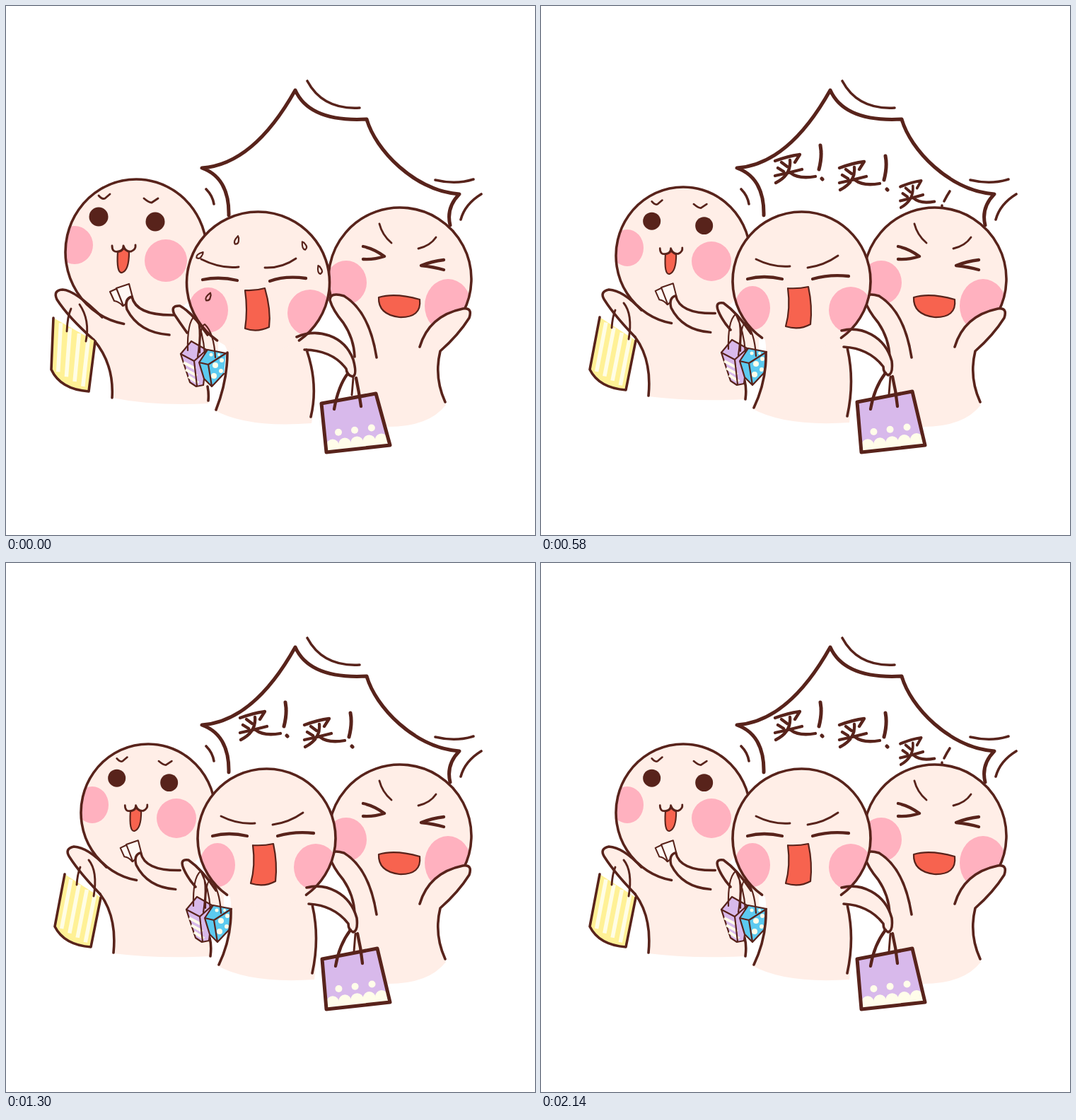
An HTML page that plays this animation: 748 by 748 pixels, repeating every 2340 ms.

```html
<!DOCTYPE html>
<html lang="zh">
<head>
<meta charset="utf-8">
<title>买！买！买！</title>
<style>
html, body { margin: 0; width: 100%; height: 100%; overflow: hidden; background: #fff; }
svg { display: block; width: 100%; height: 100%; }
.line { fill: none; stroke: #58231b; stroke-width: 3.6; stroke-linecap: round; stroke-linejoin: round; }
.thin { stroke-width: 2.2; }
.soft { stroke-width: 2.9; }
.wide { stroke-width: 4.3; }
.bold { stroke-width: 5; }
.skin { fill: #ffeee7; }
.pink { fill: #ffb1bf; }
.red { fill: #f7634f; }
.cream { fill: #fffdea; }
.paper { fill: #fff8f4; }
.yellow { fill: #fff196; }
.lilac { fill: #d8b9eb; }
.blue { fill: #5ccaf0; }
.dark { fill: #58231b; }
.pose, .word { visibility: hidden; animation: pose 780ms step-end infinite; }
@keyframes pose { 0% { visibility: visible } 33.33%, 100% { visibility: hidden } }
@keyframes glyph0 { 0% { visibility: hidden } 3.84%, 100% { visibility: visible } }
@keyframes bang0 { 0% { visibility: hidden } 7.69%, 100% { visibility: visible } }
@keyframes glyph1 { 0% { visibility: hidden } 37.17%, 100% { visibility: visible } }
@keyframes bang1 { 0% { visibility: hidden } 41.02%, 100% { visibility: visible } }
@keyframes glyph2 { 0% { visibility: hidden } 70.51%, 100% { visibility: visible } }
@keyframes bang2 { 0% { visibility: hidden } 74.35%, 100% { visibility: visible } }
</style>
</head>
<body>
<svg id="stage" viewBox="0 0 748 748"></svg>
<script>
const line = (d, pen = '') => `<path class="line ${pen}" d="${d}"/>`;
const fill = (cls, d) => `<path class="${cls}" d="${d}"/>`;
const both = (cls, d, pen = '') => fill(cls, d) + line(d, pen);
const oval = (cls, [x, y, rx, ry = rx]) => `<ellipse class="${cls}" cx="${x}" cy="${y}" rx="${rx}" ry="${ry}"/>`;
const shift = (t, body) => `<g transform="${t}">${body}</g>`;
const mix = (a, b, t) => a.map((v, i) => v + (b[i] - v) * t);
// Point inside a quad given as top-left, top-right, bottom-right, bottom-left.
const inQuad = ([a, b, c, d], s, t) => mix(mix(a, b, s), mix(d, c, s), t);
let clips = 0;

// Head ellipse with clipped cheeks; its outline runs clockwise between two angles.
function head([cx, cy, rx, ry], from, to, cheeks) {
  const at = deg => {
    const r = deg * Math.PI / 180;
    return `${cx + rx * Math.cos(r)} ${cy + ry * Math.sin(r)}`;
  };
  const id = 'head' + clips++, shape = [cx, cy, rx, ry];
  return `<clipPath id="${id}">${oval('', shape)}</clipPath>` + oval('skin', shape) +
    `<g clip-path="url(#${id})">${cheeks.map(c => oval('pink', c)).join('')}</g>` +
    line(`M${at(from)} A${rx} ${ry} 0 1 1 ${at(to)}`);
}

function drops(list) {
  return list.map(([x, y, turn]) =>
    shift(`translate(${x} ${y}) rotate(${turn})`, line('M1 -6 Q-5 3 -1 6 Q4 5 3 0 Q3 -4 1 -6', 'thin'))).join('');
}

function stripedBag(q, handle) {
  const [a, b, c, d] = q;
  const sides = `M${a} L${d} Q${d[0] + 13} ${c[1] - 3} ${c} L${b}`;
  let out = fill('yellow', sides + 'Z');
  for (let i = 0; i < 4; i++) {
    const s = .18 + i * .22;
    out += `<path d="M${inQuad(q, s, .02)} L${inQuad(q, s, .97)}" stroke="#fffde6" stroke-width="5.5"/>`;
  }
  return out + line(sides) + line(handle, 'soft');
}

function dottedBag(q, handle, backHandle) {
  let out = fill('lilac', `M${q.join('L')}Z`);
  for (let i = 0; i < 5; i++) out += oval('cream', [...inQuad(q, .11 + i * .195, .88), 9]);
  out += fill('cream', `M${[[0, .88], [1, .88], [1, 1], [0, 1]].map(p => inQuad(q, ...p)).join('L')}Z`);
  [.23, .5, .78].forEach(s => out += oval('cream', [...inQuad(q, s, .63), 5]));
  return out + line(`M${q.join('L')}Z`, 'bold') + line(backHandle, 'soft') + line(handle, 'wide');
}

const smallBags =
  both('lilac', 'M247 492 L262 474 L285 487 L279 536 L269 538 L260 532Z', 'thin') +
  `<path d="M251 504 L268 513 M254 514 L270 523 M258 524 L272 533" stroke="#fffdea" stroke-width="4"/>` +
  line('M247 492 L266 502 L284 486 M266 502 L270 537', 'thin') +
  fill('blue', 'M273 504 L285 486 L311 491 L308 520 L291 538 L280 527Z') +
  [[296, 508, 4], [305, 501, 3], [294, 523, 4], [304, 516, 3], [290, 493, 2.5], [301, 493, 2]].map(c => oval('cream', c)).join('') +
  line('M311 491 L285 486 L273 504 L280 527 L291 538 L308 520 M273 504 L286 507 L311 491 M286 507 L291 538', 'thin') +
  line('M257 487 Q256 447 267 438 Q278 448 271 496 M268 439 Q279 462 281 492 M274 490 Q274 452 281 450 Q294 462 296 497', 'thin');

const leftFace =
  line('M131 268 Q136 274 140 272 L147 266 M195 272 Q202 278 206 278 L215 272', 'soft') +
  oval('dark', [131, 298, 13.5]) + oval('dark', [211, 305, 13.5]);

const money =
  both('paper', 'M147 404 L158 399 L170 416 L165 424 Q160 418 153 417Z', 'thin') +
  both('paper', 'M156 399 L174 393 L179 412 L166 424Z', 'thin') +
  fill('skin', 'M178 411 Q167 414 171 429 Q188 462 231 465 L238 437 Q184 438 178 411') +
  line('M231 465 Q188 462 171 429 Q167 414 178 411 Q184 438 238 437');

function left(p) {
  return fill('skin', p.body) + fill('skin', p.arm) + head(p.head, 100, 380, p.cheeks) +
    line(p.arm) + line(p.sides) + shift(p.faceAt, leftFace) +
    shift(p.mouthAt, both('red', p.tongue, 'thin') + line('M150 339 Q150 349 159 347 Q166 346 166 339 Q169 348 177 347 Q184 344 183 338', 'soft')) +
    shift(p.moneyAt, money) + stripedBag(p.bag, p.handle);
}

function middle(p) {
  return fill('skin', p.body) + head(p.head, 125, 415, p.cheeks) + fill('skin', p.hand) + line(p.hand) +
    shift(p.bagsAt, smallBags) + line(p.lines) + line(p.brows, 'soft') + line(p.eyes, 'wide') +
    both('red', p.mouth, 'thin') + dottedBag(p.bag, p.handle, p.backHandle);
}

function right(p) {
  return head(p.head, 165, 388, p.cheeks) + fill('skin', p.body) +
    line(p.lines) + line(p.brows, 'soft') + line(p.eyes, 'wide') + both('red', p.mouth, 'thin');
}

const longTongue = 'M158 348 Q156 378 164 377 Q174 374 174 348 Q167 344 166 343 Q164 347 158 348';

const lefts = [{
  head: [184, 348, 100, 103], cheeks: [[97, 338, 26, 27], [226, 360, 30, 30]],
  body: 'M136 430 L124 468 Q153 505 150 554 Q210 566 286 562 L286 520 L300 490 L300 440Z',
  arm: 'M136 440 Q98 402 80 401 Q66 402 72 415 Q88 440 124 472',
  sides: 'M124 472 Q153 506 150 554 M285 538 Q287 548 286 558',
  faceAt: '', mouthAt: '', moneyAt: '', tongue: longTongue,
  bag: [[67, 441], [126, 474], [117, 545], [64, 514]],
  handle: 'M86 460 Q87 438 92 428 M104 422 Q119 444 113 474'
}, {
  head: [185, 356, 102, 101], cheeks: [[98, 347, 25, 28], [227, 363, 30, 29]],
  body: 'M146 440 L131 482 Q162 515 159 556 Q215 566 286 562 L286 520 L295 490 L295 435Z',
  arm: 'M146 451 Q112 434 92 433 Q77 436 84 448 Q98 465 131 484',
  sides: 'M131 484 Q162 516 159 555 M285 532 Q287 546 286 558',
  faceAt: 'translate(1 6)', mouthAt: 'translate(0 -5)', moneyAt: 'translate(2 2)',
  tongue: 'M157 347 Q155 365 163 365 Q172 364 173 347 Q167 344 166 343 Q164 347 157 347',
  bag: [[77, 474], [132, 489], [131, 550], [77, 537]],
  handle: 'M95 478 Q95 470 98 462 M114 444 Q125 458 122 489'
}, {
  head: [201, 353, 95, 97], cheeks: [[122, 342, 23, 26], [241, 361, 28, 28]],
  body: 'M142 425 L132 468 Q156 505 152 552 Q215 560 290 556 L290 520 L308 490 L308 440Z',
  arm: 'M142 430 Q116 402 96 401 Q82 404 90 416 Q104 438 133 468',
  sides: 'M133 468 Q157 500 152 551 M288 530 Q291 542 289 556',
  faceAt: 'translate(35.5 28.5) scale(.925)', mouthAt: 'translate(25 19) scale(.955)',
  moneyAt: 'translate(25 15) scale(.93 .96)', tongue: longTongue,
  bag: [[83, 440], [134, 473], [120, 543], [69, 514]],
  handle: 'M100 455 Q101 440 105 430 M117 420 Q130 436 124 471'
}];

const middles = [{
  head: [356.5, 391, 101, 100], cheeks: [[286, 430, 28, 32], [430, 434, 32, 33]],
  body: 'M300 460 L411 466 C440 455 478 465 491 500 Q497 522 490 524 Q482 522 481 513 Q462 487 425 486 Q442 535 432 590 Q340 597 294 571 Q313 530 313 487Z',
  hand: 'M285 465 Q264 434 246 424 Q232 423 238 436 Q246 448 256 462',
  lines: 'M411 468 C440 455 478 465 491 500 Q497 522 490 524 Q482 522 481 513 Q462 487 422 486 M425 486 Q442 535 431 581 M313 490 Q313 530 297 571',
  brows: 'M276 358 Q304 372 329 369 M366 370 Q390 371 410 357',
  eyes: 'M278 387 Q302 382 327 388 M373 389 Q395 381 424 385',
  mouth: 'M338 402 Q352 403 366 399 Q375 430 372 454 Q355 462 338 456 Q342 430 338 402',
  bagsAt: '', bag: [[446, 562], [523, 548], [543, 621], [453, 631]],
  handle: 'M464 570 Q470 537 483 520 M495 526 Q499 545 502 566', backHandle: 'M491 526 L489 550'
}, {
  head: [356.5, 373, 103, 102], cheeks: [[282, 418, 29, 32], [430, 422, 31, 34]],
  body: 'M300 455 L400 464 C440 442 482 450 497 485 Q504 514 496 518 Q488 516 488 502 Q462 478 428 478 Q447 530 434 589 Q340 594 288 570 Q313 530 306 480Z',
  hand: 'M280 458 Q260 424 243 412 Q229 411 235 428 Q242 440 252 456',
  lines: 'M400 465 Q410 461 418 459 M427 451 C458 446 486 460 497 485 Q504 514 496 518 Q488 516 488 502 Q462 478 424 477 M428 478 Q447 530 433 579 M307 487 Q312 530 291 569',
  brows: 'M288 344 Q310 358 329 355 M366 355 Q390 354 410 339',
  eyes: 'M277 376 Q305 367 340 374 M374 378 Q400 370 424 370',
  mouth: 'M338 399 Q352 403 365 398 Q373 406 371 416 Q366 428 356 427 L335 427 Q340 414 338 399',
  bagsAt: 'translate(-6 -5)', bag: [[448, 559], [535, 546], [547, 620], [453, 631]],
  handle: 'M469 568 Q473 535 488 515 M502 518 Q509 540 510 566', backHandle: 'M499 520 L497 550'
}, {
  head: [368.5, 389, 97.5, 98], cheeks: [[299, 427, 25, 31], [438, 430, 31, 33]],
  body: 'M315 460 L420 463 C452 452 486 466 496 502 Q498 520 491 522 Q484 519 484 510 Q464 484 432 482 Q444 530 436 589 Q345 595 298 569 Q320 530 318 480Z',
  hand: 'M297 463 Q278 434 258 420 Q245 418 251 432 Q257 446 268 458',
  lines: 'M425 459 C452 452 486 466 496 502 Q498 520 491 522 Q484 519 484 510 Q464 484 428 482 M433 483 Q444 530 433 580 M318 490 Q319 530 301 568',
  brows: 'M304 358 Q328 370 352 368 M377 370 Q400 367 420 353',
  eyes: 'M292 386 Q315 380 341 386 M384 386 Q408 379 435 382',
  mouth: 'M349 399 Q364 400 378 397 Q384 425 381 450 Q365 459 346 453 Q353 428 349 399',
  bagsAt: 'translate(8 -2)', bag: [[447, 560], [525, 545], [543, 621], [453, 631]],
  handle: 'M466 570 Q471 540 487 519 M497 524 Q502 545 504 566', backHandle: 'M494 524 L492 549'
}];

const leaning = {
  head: [557, 386, 101, 101], cheeks: [[481, 391, 29, 31], [625, 424, 33, 38]],
  body: 'M458 416 Q464 432 478 450 Q495 475 493 560 L540 595 Q598 595 622 564 Q604 525 614 488 Q640 465 655 441 Q660 426 646 428 Q598 440 585 482 L585 440 L524 440 L524 497 Q514 432 478 410 Q458 404 458 416',
  lines: 'M524 497 Q514 432 478 410 Q458 404 458 416 Q462 430 477 448 Q492 470 493 496 M585 482 Q598 438 646 428 Q660 426 655 441 Q640 465 614 488 Q605 525 621 560',
  brows: 'M528 308 Q532 324 545 335 M608 327 Q600 339 583 343',
  eyes: 'M505 340 Q520 343 535 354 Q520 359 505 358 M619 359 Q602 361 587 367 Q605 369 619 373',
  mouth: 'M527 412 Q550 405 585 415 Q588 441 556 440 Q526 436 527 412'
};
const shouting = {
  head: [566, 400, 103, 104], cheeks: [[492, 406, 30, 33], [636, 432, 33, 35]],
  body: 'M451 439 Q480 458 500 488 Q510 515 512 560 L550 607 Q608 608 634 573 Q617 540 624 502 Q660 480 683 459 Q689 444 673 443 Q630 452 603 492 L603 450 L538 450 L538 491 Q515 445 470 429 Q448 425 451 439',
  lines: 'M538 491 Q515 445 470 429 Q448 425 451 439 Q480 456 500 484 Q506 500 508 512 M603 494 Q630 452 673 443 Q689 444 683 459 Q660 480 624 502 Q618 540 633 571',
  brows: 'M538 321 Q542 336 556 347 M621 339 Q612 351 597 355',
  eyes: 'M516 352 Q532 356 548 367 Q534 371 519 370 M634 374 Q616 375 599 378 Q616 384 631 388',
  mouth: 'M534 399 Q560 392 597 403 Q604 432 591 453 Q574 470 556 466 Q529 455 529 425 Q529 407 534 399'
};
const rights = [leaning, shouting, leaning];

const sweat = [
  drops([[326, 331, 10], [274, 352, 40], [421, 339, -30], [443, 373, -25], [286, 411, 20]]),
  drops([[231, 365, 50], [254, 411, -20], [278, 282, 55], [357, 293, -35], [439, 294, -35], [472, 340, -35]]) +
    line('M479 726 Q482 724 485 726', 'thin'),
  ''
];

const bubble =
  line('M315 296 Q316 243 277 229 Q350 224 409 119 C422 148 455 163 510 160 C522 203 577 261 641 266 Q622 285 628 310', 'bold') +
  line('M426 106 Q448 147 500 144 M607 246 Q636 253 661 245 M672 266 Q649 280 643 302 M283 259 Q292 268 294 280');

const glyph = line('M331 219 Q350 212 366 210 L359 221 M340 221 L348 227 M335 229 L343 234 M331 240 Q350 236 369 231 M352 218 Q354 239 332 250 M353 236 Q364 245 388 241', 'wide');
const bang = line('M395 197 Q398 212 393 231 M397 244 L398 245', 'bold');
const words = [
  [glyph, bang],
  [shift('translate(91 10)', glyph), shift('translate(92 15)', bang)],
  [shift('translate(226.6 47.5) scale(.85 .95)', glyph), line('M578 262 Q574 268 570 276 M567 282 L567 283')]
];

const wordLayer = words.map((parts, i) => parts.map((part, k) =>
  `<g class="word" style="animation-name:${k ? 'bang' : 'glyph'}${i}">${part}</g>`).join('')).join('');
const poseLayer = [0, 1, 2].map(i =>
  `<g class="pose" style="animation-delay:${i * 260 - 780}ms">` +
  left(lefts[i]) + right(rights[i]) + middle(middles[i]) + sweat[i] + '</g>').join('');

document.getElementById('stage').innerHTML = bubble + wordLayer + poseLayer;
</script>
</body>
</html>
```
